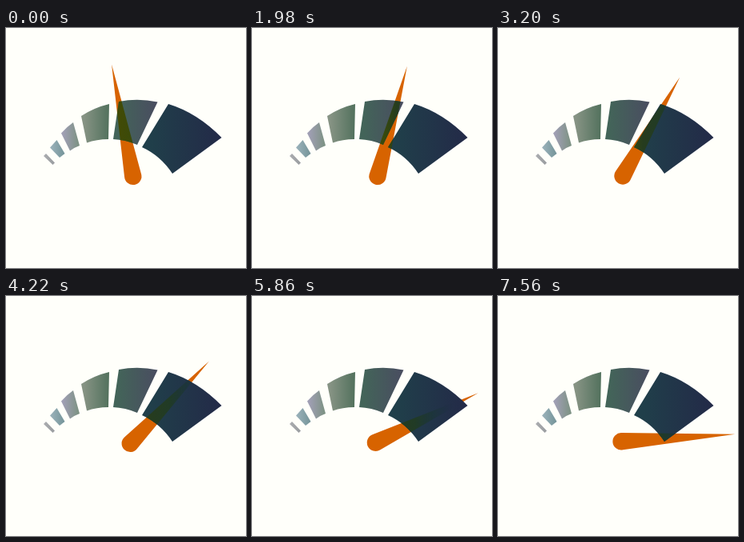
An HTML page for the animation above (7.58 s loop, 300 by 300 pixels).

```html
<!DOCTYPE html>
<html lang="en">
<head>
<meta charset="utf-8">
<title>Gauge</title>
<style>
  html, body { margin: 0; width: 100%; height: 100%; overflow: hidden; background: #fffffa; }
  svg { display: block; width: 100%; height: 100%; }
</style>
</head>
<body>
<svg viewBox="0 0 300 300">
  <defs>
    <path id="needle" d="M0-138.5L10.6 2.5A10.7 10.7 0 1 1-10.6 2.5Z"/>
    <clipPath id="dial"></clipPath>
    <linearGradient id="shade" gradientUnits="userSpaceOnUse" x1="135" y1="0" x2="250" y2="0">
      <stop offset="0" stop-color="#444b04"/>
      <stop offset=".26" stop-color="#384a0c"/>
      <stop offset=".4" stop-color="#263c1e"/>
      <stop offset=".6" stop-color="#213b26"/>
      <stop offset=".78" stop-color="#1c3538" stop-opacity=".8"/>
      <stop offset="1" stop-color="#1c3040" stop-opacity="0"/>
    </linearGradient>
    <mask id="hand" maskUnits="userSpaceOnUse" x="0" y="0" width="300" height="300">
      <use href="#needle" class="turn" fill="#fff"/>
    </mask>
  </defs>
  <use href="#needle" class="turn" fill="#d76300"/>
  <g id="segments"></g>
  <g mask="url(#hand)">
    <rect width="300" height="300" fill="url(#shade)" clip-path="url(#dial)"/>
  </g>
</svg>
<script>
  const NS = 'http://www.w3.org/2000/svg';
  const $ = id => document.getElementById(id);
  const add = (parent, tag, attrs) => {
    const el = document.createElementNS(NS, tag);
    for (const key in attrs) el.setAttribute(key, attrs[key]);
    return parent.appendChild(el);
  };

  // Outline and left-to-right colours of each dial segment
  const segments = [
    ['M50 157L61 168.5L58.5 171L47 160Z', '#a9abae', '#9a9da0'],
    ['M63.5 140L73.5 157L67 162L55 149.5Z', '#98b0b8', '#76959a'],
    ['M84 118L92 147Q85 149.5 80 153.5L69 131.5Q76 123.5 84 118Z', '#a09fb4', '#7d9284'],
    ['M129 95L128 139Q113 139 101 143.5L94 110Q110 99.5 129 95Z', '#869384', '#55735f'],
    ['M141 92Q165 87.5 189.500 92.500L164 146Q149 139.500 134 139Z', '#436459', '#494e60'],
    ['M203 95Q239 106 269.500 137L208 182Q193 159.500 170 149Z', '#203f4a', '#232b48']
  ];
  segments.forEach(([d, from, to], i) => {
    const grad = add(document.querySelector('defs'), 'linearGradient', { id: 'tone' + i });
    add(grad, 'stop', { offset: 0.1, 'stop-color': from });
    add(grad, 'stop', { offset: 0.95, 'stop-color': to });
    add($('segments'), 'path', { d, fill: `url(#tone${i})` });
    add($('dial'), 'path', { d });
  });

  // Each 140 ms beat has three poses, starting at 0, 20 and 120 ms
  const LOOP = 7580, BEAT = 140, START = -10.8, STEP = 0.6;
  const hands = document.querySelectorAll('.turn');
  const began = performance.now();

  function draw() {
    const t = (performance.now() - began) % LOOP;
    const rest = t % BEAT;
    const pose = Math.floor(t / BEAT) * 3 + (rest >= 20) + (rest >= 120);
    const angle = START + pose * STEP;
    hands.forEach(h => h.setAttribute('transform', `translate(158 181.5) rotate(${angle})`));
    requestAnimationFrame(draw);
  }
  draw();
</script>
</body>
</html>
```
